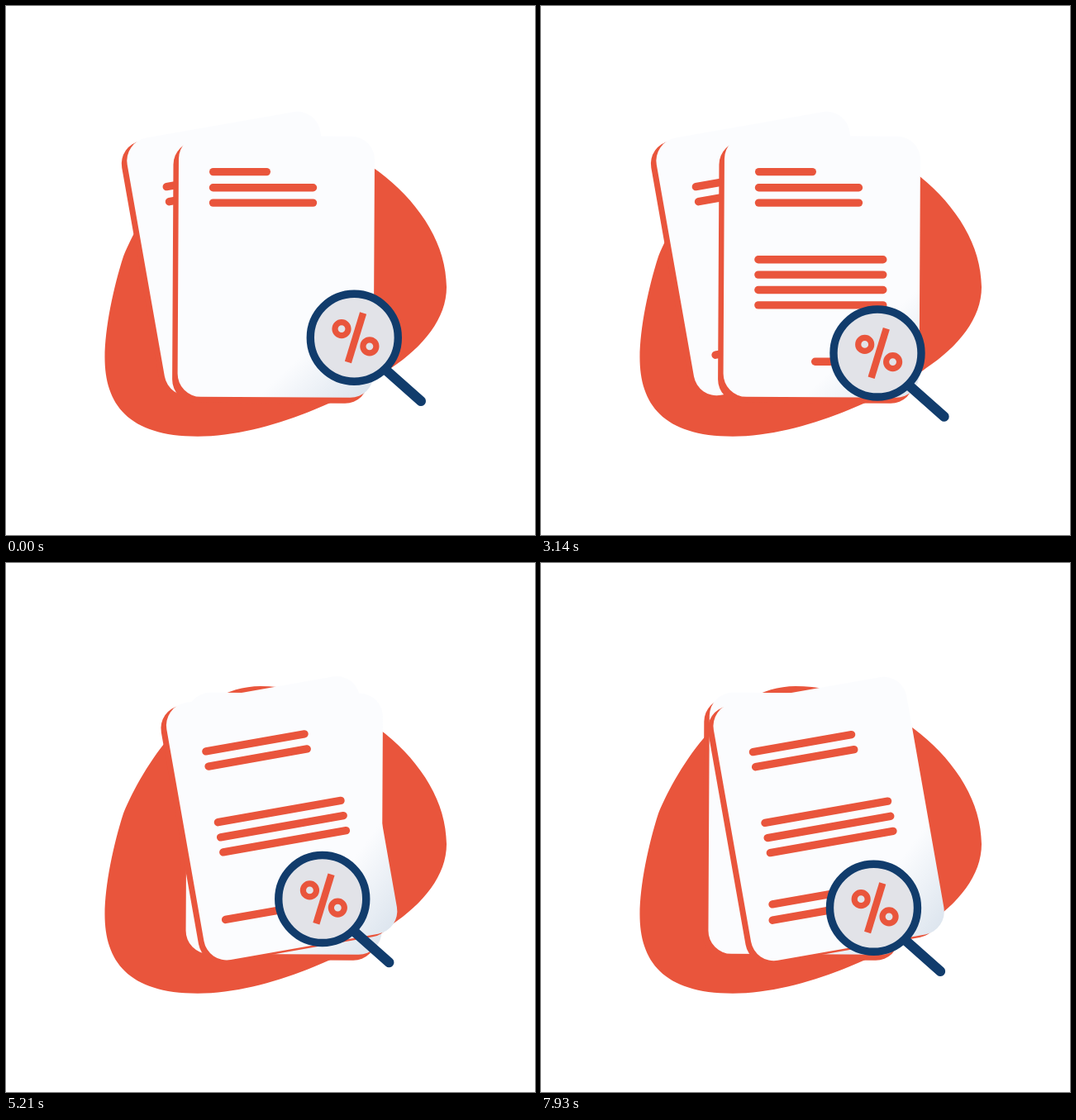
Animation, 640 px wide and 640 px high, one loop 8 s. Source, as an HTML page with a canvas:

```html
<!DOCTYPE html>
<html lang="en">
<head>
<meta charset="utf-8">
<title>Document check</title>
<style>
html, body { margin: 0; width: 100%; height: 100%; overflow: hidden; background: #fff; }
canvas { display: block; width: 100%; height: 100%; }
</style>
</head>
<body>
<canvas id="stage" width="640" height="640"></canvas>
<script>
const ctx = document.getElementById('stage').getContext('2d');
const LOOP = 8;
const ORANGE = '#e9553c', NAVY = '#113c6c', PAPER = '#fbfcfe', LENS = '#e2e3e8';
const BAR = 9.4, ROW = 18.4;

// Page moves: spread apart, cross over, spread again
const SPREAD = 2.89, CROSS = 4.16, REPEAT = 7.71, MOVE = 1.27;

const blob = new Path2D(
  'M142 303C165 248 225 149 308 149C412 149 533 240 533 340' +
  'C533 378 505 412 466 438C422 471 318 520.7 232 520.7' +
  'C147 520.7 119.5 481 119.5 425C119.5 390 130 340 142 303Z');

const sheet = new Path2D();
sheet.roundRect(-118.5, -158, 237, 316, 28);

const paper = ctx.createLinearGradient(50, 89, 108, 150);
paper.addColorStop(0, PAPER);
paper.addColorStop(1, '#dee6ef');

const progress = (t, start, length) => Math.max(0, Math.min(1, (t - start) / length));
const ease = (t, start, length) => (1 - Math.cos(Math.PI * progress(t, start, length))) / 2;
const radians = degrees => degrees * Math.PI / 180;

function at(x, y, angle, draw) {
  ctx.save();
  ctx.translate(x, y);
  ctx.rotate(angle);
  draw();
  ctx.restore();
}

function fill(path, color) {
  ctx.fillStyle = color;
  ctx.fill(path);
}

function segment(x0, y0, x1, y1, width, color, cap = 'round') {
  ctx.beginPath();
  ctx.moveTo(x0, y0);
  ctx.lineTo(x1, y1);
  ctx.lineWidth = width;
  ctx.strokeStyle = color;
  ctx.lineCap = cap;
  ctx.stroke();
}

function ring(x, y, r, width, color) {
  ctx.beginPath();
  ctx.arc(x, y, r, 0, Math.PI * 2);
  ctx.lineWidth = width;
  ctx.strokeStyle = color;
  ctx.stroke();
}

// Rows of text bars between two outer edges, uncovered from the left
function bars(left, right, top, rows = 1, shown = 1) {
  ctx.save();
  ctx.beginPath();
  ctx.rect(left - 1, top - BAR, (right - left + 2) * shown, rows * ROW + BAR);
  ctx.clip();
  for (let i = 0; i < rows; i++) {
    const y = top + i * ROW;
    segment(left + BAR / 2, y, right - BAR / 2, y, BAR, ORANGE);
  }
  ctx.restore();
}

function page(x, y, angle, lift, rows, shown) {
  at(x - 6.5, y + lift, angle, () => fill(sheet, ORANGE));
  at(x, y, angle, () => fill(sheet, paper));
  return text => at(x, y, angle < 0 ? angle : 0, () => {
    bars(-81, 49.4, -95.6, 2);
    bars(-81.6, 78.7, -8.6, rows, shown);
    text();
  });
}

function drawUpright(t) {
  const x = 326.8 + 139 * (ease(t, SPREAD, MOVE) - ease(t, CROSS, MOVE)) - 71 * ease(t, REPEAT, MOVE);
  const write = page(x, 315.3, radians(0.3), 7, 4, ease(t, 0.03, 0.97));
  write(() => {
    bars(-80.8, -6.8, -114.7);
    bars(-12.8, 81.7, 114.9, 1, ease(t, 1.72, 0.75));
  });
}

function drawTilted(t) {
  const cross = ease(t, CROSS, MOVE);
  const x = 286 - 74 * ease(t, SPREAD, MOVE) + 131 * cross + 71 * ease(t, REPEAT, MOVE);
  const write = page(x, 299.5 + 10 * cross, radians(-10), 3.7, 3, ease(t, 4.15, 0.98));
  write(() => {
    bars(-89.8, 12, 90, 1, ease(t, 5.2, 0.7));
    bars(-93, 2.3, 109);
  });
}

function lensPosition(t) {
  const settle = (1 - progress(t, 0, 3.14)) ** 2;
  const rise = progress(t, 3.5, 2.4) ** 1.1;
  const fall = Math.max(0, t - 5.9);
  return [
    407 + 14.3 * settle - 35.2 * rise + 15.1 * fall,
    420 - 18.8 * settle - 19.6 * rise + 8.3 * fall
  ];
}

function drawLens(t) {
  at(...lensPosition(t), 0, () => {
    segment(37, 38, 80.7, 76.8, 12, NAVY);
    ctx.beginPath();
    ctx.arc(0, 0, 53, 0, Math.PI * 2);
    ctx.fillStyle = LENS;
    ctx.fill();
    ring(0, 0, 53, BAR, NAVY);
    segment(10.8, -29.8, -7.4, 29.8, 8.4, ORANGE, 'butt');
    ring(-15.3, -10.6, 8, 7.2, ORANGE);
    ring(18.6, 10.6, 8, 7.2, ORANGE);
  });
}

function frame(t) {
  ctx.fillStyle = '#fff';
  ctx.fillRect(0, 0, 640, 640);
  fill(blob, ORANGE);
  const pages = t < CROSS ? [drawTilted, drawUpright] : [drawUpright, drawTilted];
  for (const draw of pages) draw(t);
  drawLens(t);
}

const start = performance.now();
function tick() {
  frame((performance.now() - start) / 1000 % LOOP);
  requestAnimationFrame(tick);
}
tick();
</script>
</body>
</html>
```
